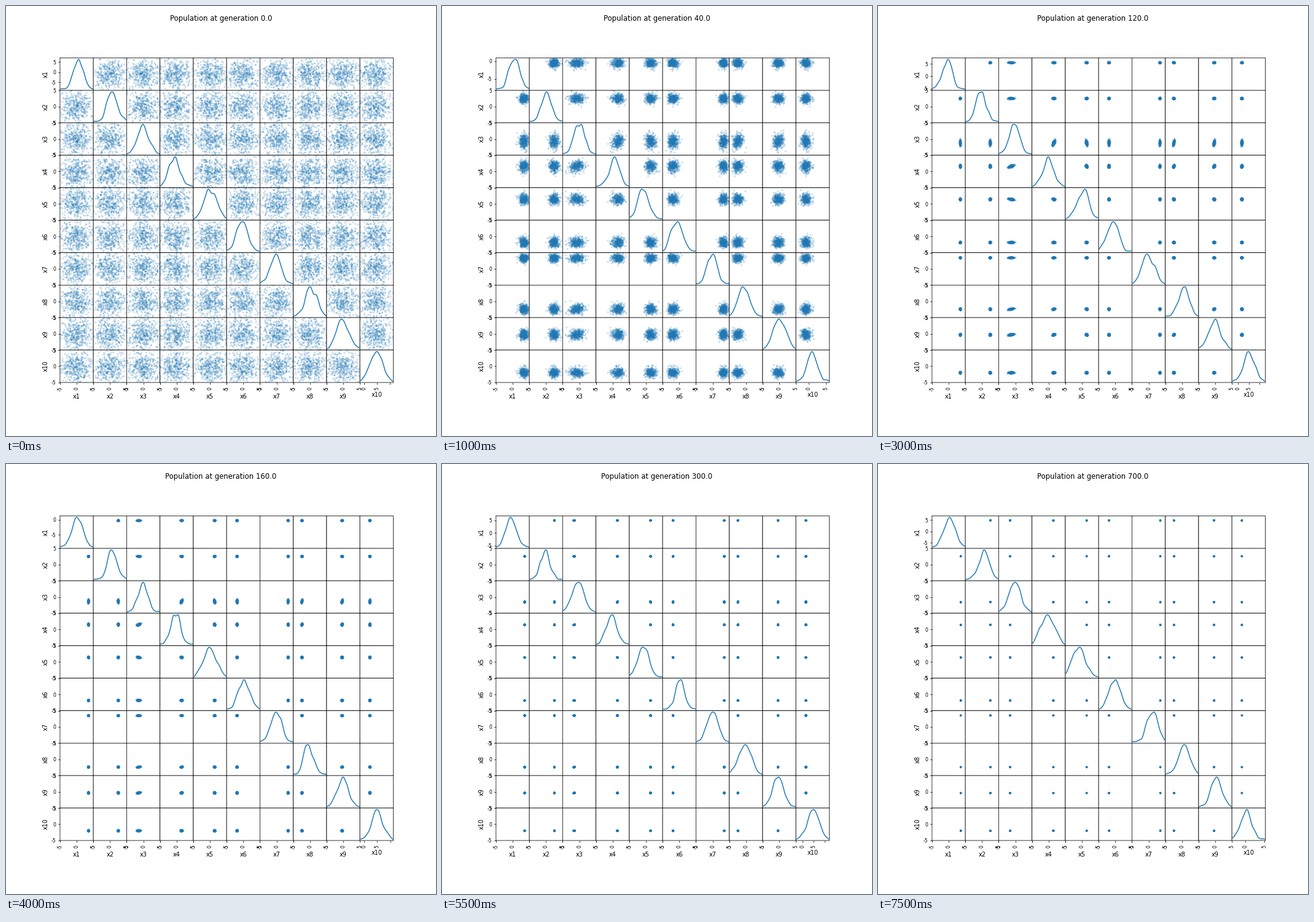
These frames come from a looping animation (700 by 700 pixels, 8000 ms). A matplotlib script:

```python
import numpy as np
import matplotlib.pyplot as plt
from matplotlib.animation import FuncAnimation
from matplotlib.ticker import MaxNLocator

plt.rcParams["font.family"] = "DejaVu Sans"

DIM, POP = 10, 400
BLUE = "#1f77b4"
LABELS = ["-5", "0", "5"]
GENERATIONS = [*range(0, 200, 20), *range(200, 800, 100)]

# Point the population settles on, and how loosely each variable is held there
BEST = np.array([3.6, 2.52, -1.55, 1.42, 1.38, -1.87, 3.5, -2.4, -.36, -2.0])
LOOSE = np.array([.88, .95, 1.5, 1.2, 1.05, 1, .88, 1, 1.05, 1])
LINKED = {3: .6, 4: -.4, 7: .5, 8: .45}  # correlation with x3


def population(gen, rng):
    z = rng.standard_normal((POP, DIM))
    bond = min(gen / 120, 1)
    for k, c in LINKED.items():
        c *= bond
        z[:, k] = c * z[:, 2] + np.sqrt(1 - c * c) * z[:, k]
    arrive = np.interp(gen, [0, 20, 40], [0, .65, 1])
    drift = 1.5 * (LOOSE - 1) * np.interp(gen, [40, 200], [1, 0])
    spread = np.exp(np.interp(gen, [0, 20, 40, 80, 120, 200, 500],
                              np.log([2.5, 1.45, .77, .29, .14, .09, .015])))
    power = np.interp(gen, [0, 40, 80, 120, 200], [0, 1, 1.2, 2.6, 1.7])
    return (BEST + drift) * arrive + z * spread * LOOSE ** power


def kde(sample, x):
    width = sample.std(ddof=1) * len(sample) ** -.2
    return np.exp(-((x[:, None] - sample) / width) ** 2 / 2).mean(axis=1)


def limits(sample):
    pad = .025 * np.ptp(sample)
    return sample.min() - pad, sample.max() + pad


def set_ticks(axis, sample, skip_outside):
    """Automatic ticks over the sample's range, with the fixed labels in order."""
    lo, hi = limits(sample)
    locs = MaxNLocator(2, steps=[1, 2, 2.5, 5, 10]).tick_values(lo, hi)
    marks = (locs - lo) / (hi - lo)
    if skip_outside:
        marks = marks[(marks >= 0) & (marks <= 1)]
    names = (LABELS + [""] * len(marks))[:len(marks)]
    shown = [(m, s) for m, s in zip(marks, names) if 0 <= m <= 1]
    axis.set_ticks([m for m, _ in shown], [s for _, s in shown])


fig, axes = plt.subplots(DIM, DIM, figsize=(10, 10), dpi=70)
fig.subplots_adjust(left=.1256, right=.9006, bottom=.1244, top=.8794,
                    wspace=0, hspace=0)
title = fig.suptitle("", fontsize=12)
unit = np.linspace(0, 1, 200)
lines, clouds = [], {}

for (i, j), ax in np.ndenumerate(axes):
    if i == j:
        ax.set(xlim=(0, 1), ylim=(0, 1))
        lines += ax.plot(unit, unit, color=BLUE)
    else:
        ax.set(xlim=(-5, 5), ylim=(-5, 5))
        ax.set_xticks([-5, 0, 5], LABELS)
        ax.set_yticks([-5, 0, 5], LABELS)
        clouds[i, j] = ax.scatter(np.zeros(POP), np.zeros(POP), s=36, marker=".",
                                  color=BLUE, alpha=.25, edgecolors="none")
    ax.set(xlabel=f"x{j + 1}", ylabel=f"x{i + 1}")
    ax.tick_params(axis="x", labelsize=8, labelrotation=90)
    ax.tick_params(axis="y", labelsize=8)
    ax.xaxis.set_visible(i == DIM - 1)
    ax.yaxis.set_visible(j == 0)
    for spine in ax.spines.values():
        spine.set_snap(False)


def update(n):
    gen = GENERATIONS[n]
    pop = population(gen, np.random.default_rng(gen + 7))
    for (i, j), cloud in clouds.items():
        cloud.set_offsets(pop[:, [j, i]])
    for line, sample in zip(lines, pop.T):
        lo, hi = limits(sample)
        x = sample.min() + unit * np.ptp(sample)
        y = kde(sample, x)
        line.set_data((x - lo) / (hi - lo), (.05 + (y - y.min()) / np.ptp(y)) / 1.1)
    set_ticks(axes[0, 0].yaxis, pop[:, 0], True)
    set_ticks(axes[-1, -1].xaxis, pop[:, -1], False)
    title.set_text(f"Population at generation {gen:.1f}")
    return [title, *lines, *clouds.values()]


anim = FuncAnimation(fig, update, frames=len(GENERATIONS), interval=500, repeat=True)
plt.show()
```
